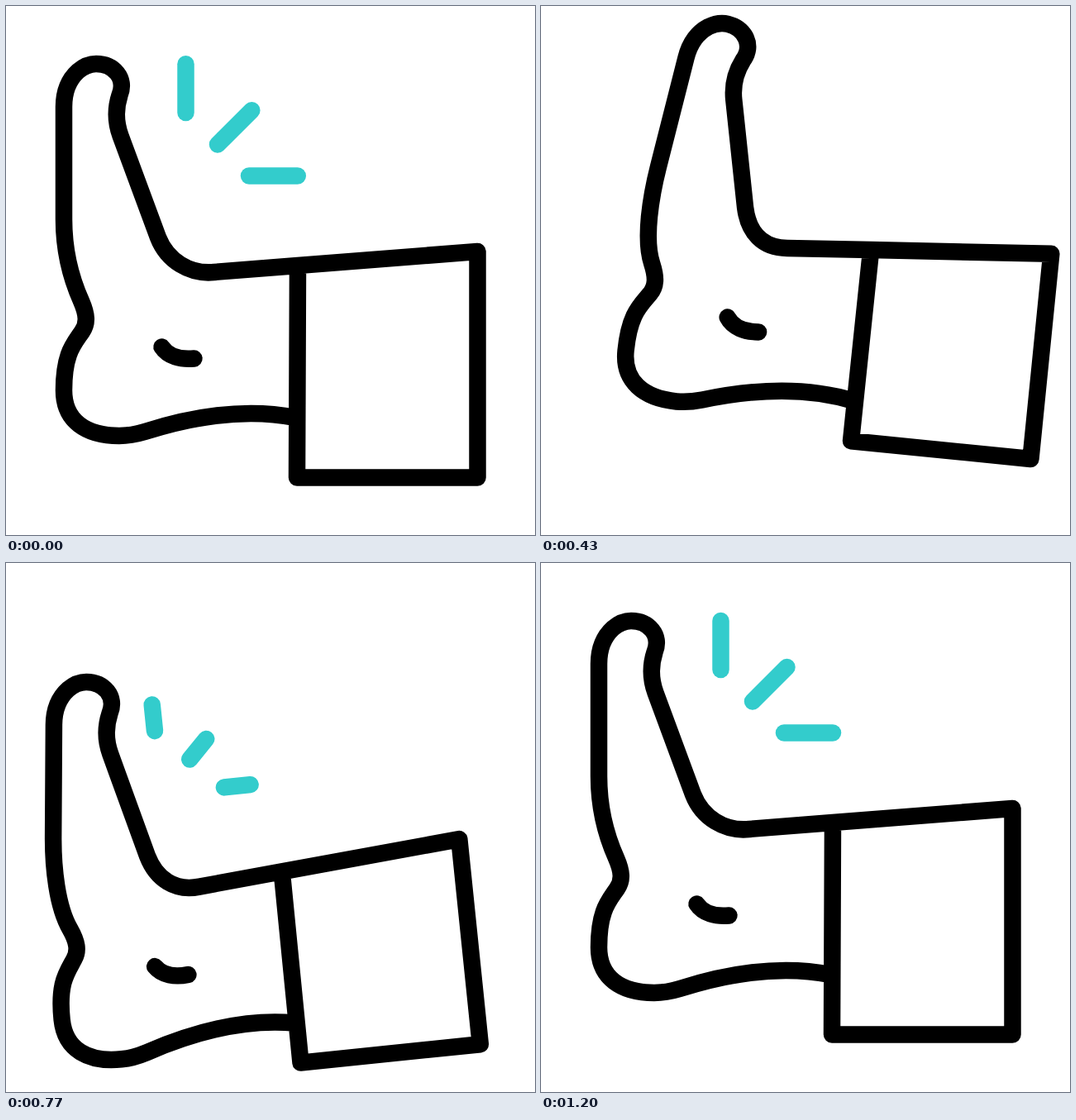
An HTML page for the animation above (1670 ms loop, 640 by 640 pixels).

```html
<!DOCTYPE html>
<html lang="en">
<head>
<meta charset="utf-8">
<title>Kicking foot</title>
<style>
  html, body { margin: 0; height: 100%; overflow: hidden; background: #fff; }
  svg { display: block; width: 100%; height: 100%; }
  path { fill: none; stroke: #000; stroke-width: 20.5; stroke-linecap: round; stroke-linejoin: round; }
  #rays path { stroke: #33cccc; }
</style>
</head>
<body>
<svg viewBox="0 0 640 640">
  <g id="leg">
    <path id="outline"/>
    <path d="M188.5,412.5C196,424 211,428 227.5,426.5"/>
    <g id="rays">
      <path pathLength="1" d="M217.5,129V70"/>
      <path pathLength="1" d="M256,167.5L297.5,126"/>
      <path pathLength="1" d="M294,205.5H353"/>
    </g>
  </g>
</svg>
<script>
const LOOP = 1670;
const leg = document.getElementById('leg');
const outline = document.getElementById('outline');
const rays = document.getElementById('rays');

// Points marked * bend with the toes, points marked _ belong to the cuff hem.
const SHAPE = `M353,314 L252,322 C222,325 195,308* 184,280* L138.5,157*
  C133,142* 132,125* 137.5,108* C146,87* 130,70* 109,70* C101,70* 94,73* 87,79*
  C76,89* 70,104* 70,122* L70,258* C70,294* 78,328 91,357 C98,373 99,384 92,394
  C82,409 70,420 70,465 C70,502 97,520 137,520 C148,520 158,518 168,515
  C228,496 290,486 350,498 M353,314 L570.5,297 L570.5,570.5_ L352,570.5_ Z`;

// time, x, y, turn of the leg, bend of the toes, shortening of the cuff
const POSES = [
  [0, 0, 0, 0, 0, 0],
  [250, 0.8, 0, 0.1, 0.4, 1],
  [300, 3, -0.7, 0.5, 1.8, 5],
  [430, 46, -19, 5.7, 8.5, 24],
  [510, 59, -24, 7.2, 10.5, 25],
  [630, -3, 54, -6.8, 9.7, 26],
  [690, -20, 70, -7.5, 8, 26],
  [870, -17, 36, -2.7, 4.1, 21.5],
  [1030, -2.3, 4.7, 0, 0, 31],
  [1200, 0, 0, 0, 0, 0],
  [LOOP, 0, 0, 0, 0, 0]
];

const clamp = v => Math.max(0, Math.min(1, v));

const secant = (i, k) =>
  POSES[i + 1] && POSES[i] ? (POSES[i + 1][k] - POSES[i][k]) / (POSES[i + 1][0] - POSES[i][0]) : 0;

function slope(i, k) {
  const a = secant(i - 1, k), b = secant(i, k);
  return a * b > 0 ? 2 * a * b / (a + b) : 0;
}

// Monotone cubic through the poses
function poseAt(t) {
  const i = POSES.findIndex((p, n) => n === POSES.length - 2 || t < POSES[n + 1][0]);
  const a = POSES[i], b = POSES[i + 1], span = b[0] - a[0], u = (t - a[0]) / span;
  const ease = u * u * (3 - 2 * u);
  return [1, 2, 3, 4, 5].map(k => a[k] + (b[k] - a[k]) * ease
    + span * u * (1 - u) * ((1 - u) * slope(i, k) - u * slope(i + 1, k)));
}

function bendPoint(x, y, degrees) {
  const angle = degrees * Math.PI / 180, c = Math.cos(angle), s = Math.sin(angle);
  const dx = x - 202, dy = y - 363;
  return [202 + dx * c - dy * s, 363 + dx * s + dy * c];
}

function draw(t) {
  const [x, y, turn, bend, cut] = poseAt(t);
  leg.setAttribute('transform', `translate(${x} ${y}) rotate(${turn} 352 314)`);
  outline.setAttribute('d', SHAPE.replace(/([\d.]+),([\d.]+)([*_])/g, (_, px, py, mark) =>
    mark === '*' ? bendPoint(+px, +py, bend).join() : `${px},${py - cut}`));

  const length = t < 600 ? clamp(1 - t / 250) : clamp((t - 690) / 150);
  rays.style.display = length ? '' : 'none';
  rays.style.strokeDasharray = length < 1 ? `${length} 2` : 'none';
}

function frame(now) {
  draw(now % LOOP);
  requestAnimationFrame(frame);
}
draw(0);
requestAnimationFrame(frame);
</script>
</body>
</html>
```
